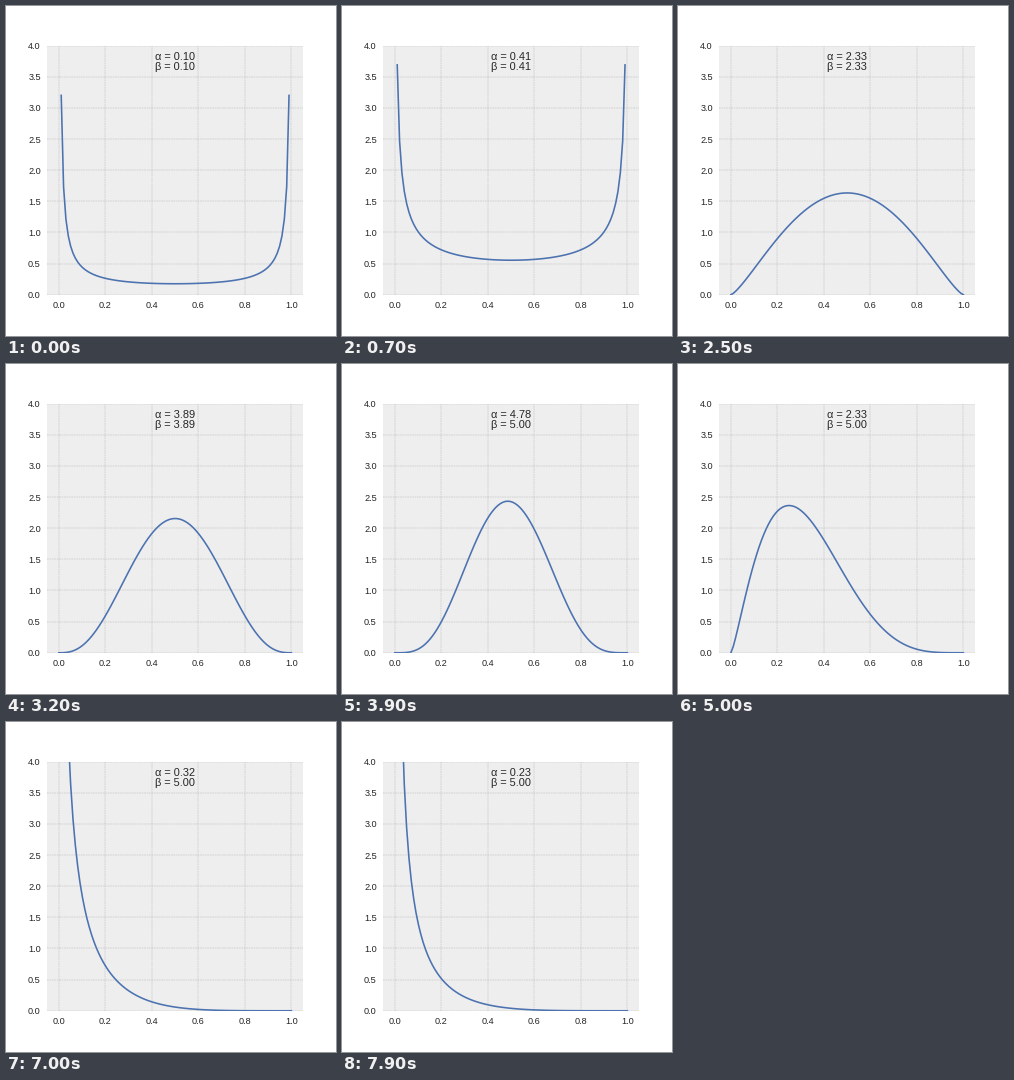
A matplotlib script for the animation above (8000 ms loop, 330 px wide and 330 px high).

```python
import math

import numpy as np
import matplotlib.pyplot as plt
from matplotlib.animation import FuncAnimation

SIZE, DPI = 330, 66
FRAMES, INTERVAL = 80, 100
INK = "#262626"

plt.rcParams["font.family"] = "Liberation Sans"

# Slow ramp below one, faster ramp above it
ramp = np.concatenate([np.linspace(0.1, 0.9, 19), np.linspace(1, 5, 19)])
x = np.linspace(0, 1, 100)


def shape_params(i):
    """Both grow together, then alpha falls and rises while beta stays."""
    phase, step = divmod(i, len(ramp))
    if phase == 0:
        return ramp[step], ramp[step]
    if phase == 1:
        return ramp[-1 - step], ramp[-1]
    return ramp[step], ramp[-1]


def beta_pdf(a, b):
    norm = math.gamma(a + b) / (math.gamma(a) * math.gamma(b))
    with np.errstate(divide="ignore"):
        return norm * x ** (a - 1) * (1 - x) ** (b - 1)


fig = plt.figure(figsize=(SIZE / DPI, SIZE / DPI), dpi=DPI, facecolor="white")
ax = fig.add_axes([0.125, 0.125, 0.775, 0.755], facecolor="#eeeeee")
ax.set_xlim(-0.05, 1.05)
ax.set_ylim(0, 4)
ax.set_xticks(np.arange(0, 1.1, 0.2))
ax.set_yticks(np.arange(0, 4.1, 0.5))
ax.xaxis.set_major_formatter("{x:.1f}")
ax.yaxis.set_major_formatter("{x:.1f}")
ax.tick_params(length=0, pad=7, labelsize=10, labelcolor=INK)
ax.set_axisbelow(True)
ax.grid(color="#b2b2b2", linestyle="--", linewidth=0.5)
for spine in ax.spines.values():
    spine.set_visible(False)

curve, = ax.plot([], [], color="#4c72b0", linewidth=1.75)


def label(baseline):
    return fig.text(0.5125, 1 - baseline / SIZE, "", size=12, color=INK,
                    ha="center", va="baseline")


alpha_label, beta_label = label(54), label(64)


def update(i):
    a, b = shape_params(i)
    y = beta_pdf(a, b)
    curve.set_data(x, np.where(np.isfinite(y), y, np.nan))
    alpha_label.set_text(f"α = {a:.2f}")
    beta_label.set_text(f"β = {b:.2f}")
    return curve, alpha_label, beta_label


anim = FuncAnimation(fig, update, frames=FRAMES, interval=INTERVAL,
                     repeat=True, repeat_delay=0)
plt.show()
```
